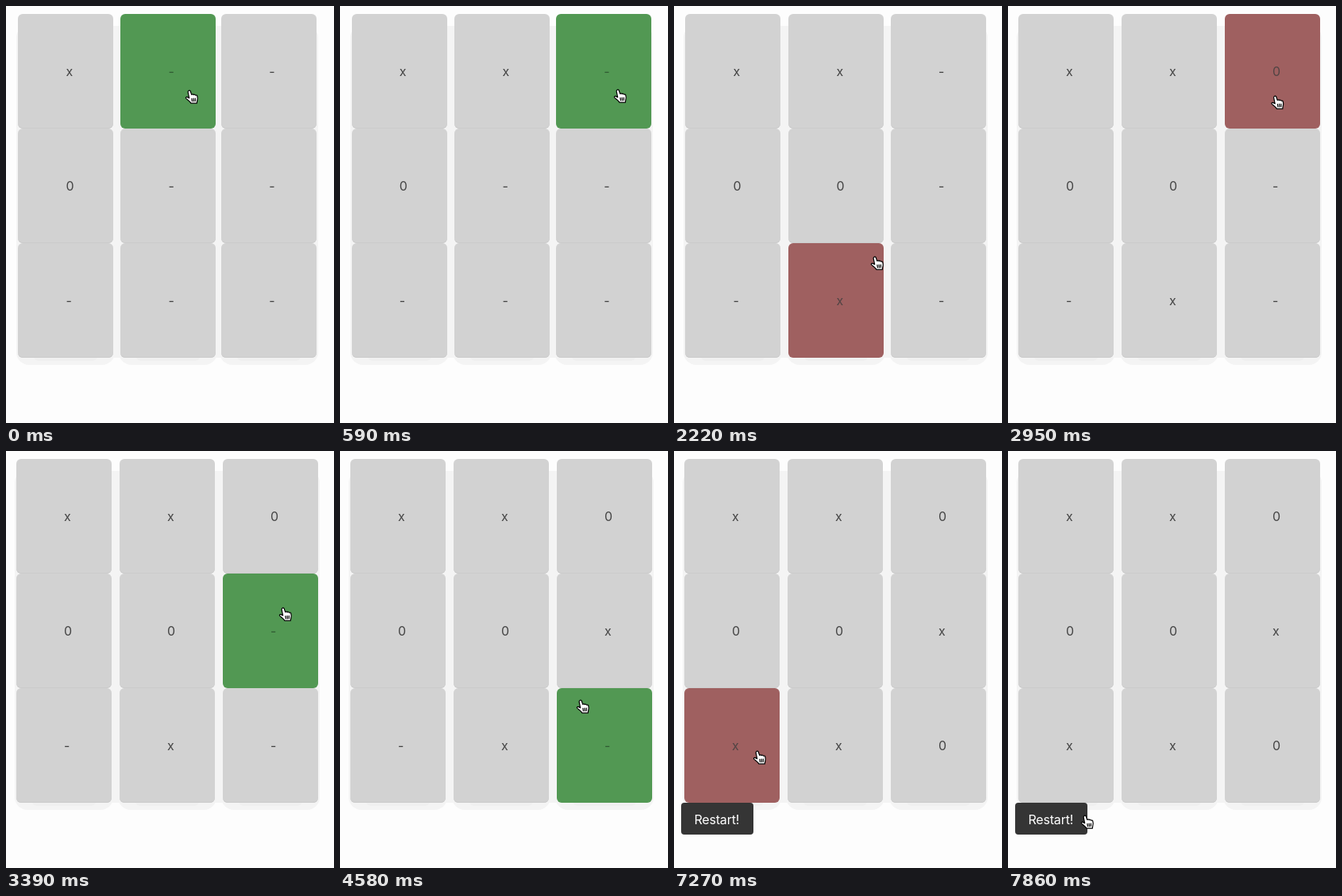
An HTML page that plays this animation: 413x524 px, repeating every 8000 ms.

```html
<!DOCTYPE html>
<html lang="en">
<head>
<meta charset="utf-8">
<title>Noughts and crosses</title>
<style>
  html, body { margin: 0; width: 100%; height: 100%; overflow: hidden; background: #fdfdfd; }
  body { position: relative; font: 16px/20px Inter, "Open Sans", sans-serif; color: #444; }
  div, svg { position: absolute; }
  .cell {
    width: 120px; height: 144px; border-radius: 6px;
    background: #d2d2d2; box-shadow: inset 0 -1px #cbcbcb;
  }
  .cell span { position: absolute; top: 62px; }
  .cell.free { background: #529853; color: #315c33; box-shadow: none; }
  .cell.taken { background: #9f6060; color: #514444; box-shadow: none; }
  .shade { top: 24px; width: 124px; height: 427px; margin-left: -2px; border-radius: 16px; background: #f4f4f4; }
  .shade::after {
    content: ""; position: absolute; left: 22px; right: 22px; bottom: 5px; height: 12px;
    border-radius: 6px; background: #f0f0f0;
  }
  .gap { top: 25px; width: 14px; height: 417px; margin-left: 118px; background: #f4f4f4; }
  #restart {
    left: 8.5px; top: 442px; width: 91px; height: 40px; border-radius: 4px;
    background: #353535; color: #fff;
  }
  #restart span { position: absolute; left: 17px; top: 10.5px; letter-spacing: -.2px; }
  #hand { left: 0; top: 0; width: 17px; height: 19px; overflow: visible; }
</style>
</head>
<body>
<div id="board"></div>
<div id="restart"><span>Restart!</span></div>
<svg id="hand" viewBox="0 0 17 19" fill="#fff" stroke="#000" stroke-width="1.2" stroke-linejoin="round" stroke-linecap="round">
  <path d="M4.2 1.6C5 .8 6.4 1 6.8 2.2L8.2 6.4C8.7 5.6 10.2 5.6 10.7 6.6 11.4 5.9 12.7 6.2 13 7.2 13.9 6.7 15 7.2 15.3 8.2 15.9 10.2 16 12 15.2 14.2L14.8 17.2H7.4C6.6 15.4 4 13.6 1.4 11.4 .4 10.4 1.2 9 2.6 9.4L5.2 10.8 3.7 3.6C3.5 2.8 3.7 2.1 4.2 1.6Z"/>
  <path fill="none" d="M8.4 11.4l.5 3.2M10.6 11.2l.3 3.4M12.8 11v3.4"/>
</svg>
<script>
const LOOP = 8000, TICK = 148, LEAD = 15;
const SLACK = { "-": 1, x: 0.4, 0: 0 };
const board = document.getElementById("board");
const restart = document.getElementById("restart");
const hand = document.getElementById("hand");

// Pointer rests between two ticks; a click lands on the given tick.
const stops = [
  { x: 225.5, y: 105, from: 0, to: 1, click: 1 },
  { x: 344.5, y: 104, from: 4, to: 6 },
  { x: 237, y: 212, from: 8, to: 9, click: 9 },
  { x: 247.5, y: 314, from: 12, to: 15, click: 15 },
  { x: 331, y: 112, from: 18, to: 20, click: 20 },
  { x: 343.5, y: 196, from: 23, to: 28, click: 28 },
  { x: 297.5, y: 312, from: 31, to: 31 },
  { x: 309, y: 357, from: 34, to: 39, click: 36 },
  { x: 99.5, y: 376, from: 41, to: 49, click: 49 },
  { x: 91.5, y: 457, from: 53, to: 99 }
];

const add = cls => {
  const el = document.createElement("div");
  el.className = cls;
  board.append(el);
  return el;
};
const shades = [0, 1, 2].map(() => add("shade"));
const gaps = [0, 1].map(() => add("gap"));
const cells = Array.from({ length: 9 }, (_, i) => {
  const el = add("cell");
  el.style.top = 10 + 144 * Math.floor(i / 3) + "px";
  el.append(document.createElement("span"));
  return el;
});

const ease = p => p * p * (3 - 2 * p);
const cellAt = ({ x, y }) => 3 * Math.floor((y - 9) / 144) + Math.floor((x - 3) / 130);

function pointerAt(tick) {
  const i = stops.findLastIndex(s => s.from <= tick);
  const a = stops[i], b = stops[i + 1];
  if (tick <= a.to) return a;
  const p = ease((tick - a.to) / (b.from - a.to));
  return { x: a.x + (b.x - a.x) * p, y: a.y + (b.y - a.y) * p };
}

function marksAt(tick) {
  const marks = [..."x--0-----"];
  stops.filter(s => s.click <= tick)
    .forEach((s, turn) => marks[cellAt(s)] = "x0"[turn % 2]);
  return marks;
}

// Columns with narrow marks yield space to the others.
function columns(marks) {
  const slack = c => Math.min(...[c, c + 3, c + 6].map(i => SLACK[marks[i]]));
  const mid = slack(1), right = slack(2);
  return [13 + 1.4 * right + mid, 143 + 1.4 * right, 273 - 1.7 * mid];
}

function draw(t) {
  const tick = Math.floor((t + LEAD) / TICK);
  const pointer = pointerAt(tick), hover = cellAt(pointer);
  const marks = marksAt(tick);
  const cols = columns(marks), snapped = cols.map(Math.round);

  cells.forEach((el, i) => {
    const c = i % 3, label = el.firstChild;
    const state = i !== hover ? "" : marks[i] === "-" ? " free" : " taken";
    el.className = "cell" + state;
    el.style.left = snapped[c] + "px";
    label.style.left = 60 + cols[c] - snapped[c] + "px";
    label.textContent = marks[i];
  });
  [...shades, ...gaps].forEach((el, i) => el.style.left = snapped[i % 3] + "px");
  restart.style.display = marks.includes("-") ? "none" : "block";
  hand.style.transform = `translate(${pointer.x}px, ${pointer.y}px)`;
}

const start = performance.now();
function frame() {
  draw((performance.now() - start) % LOOP);
  requestAnimationFrame(frame);
}
frame();
</script>
</body>
</html>
```
